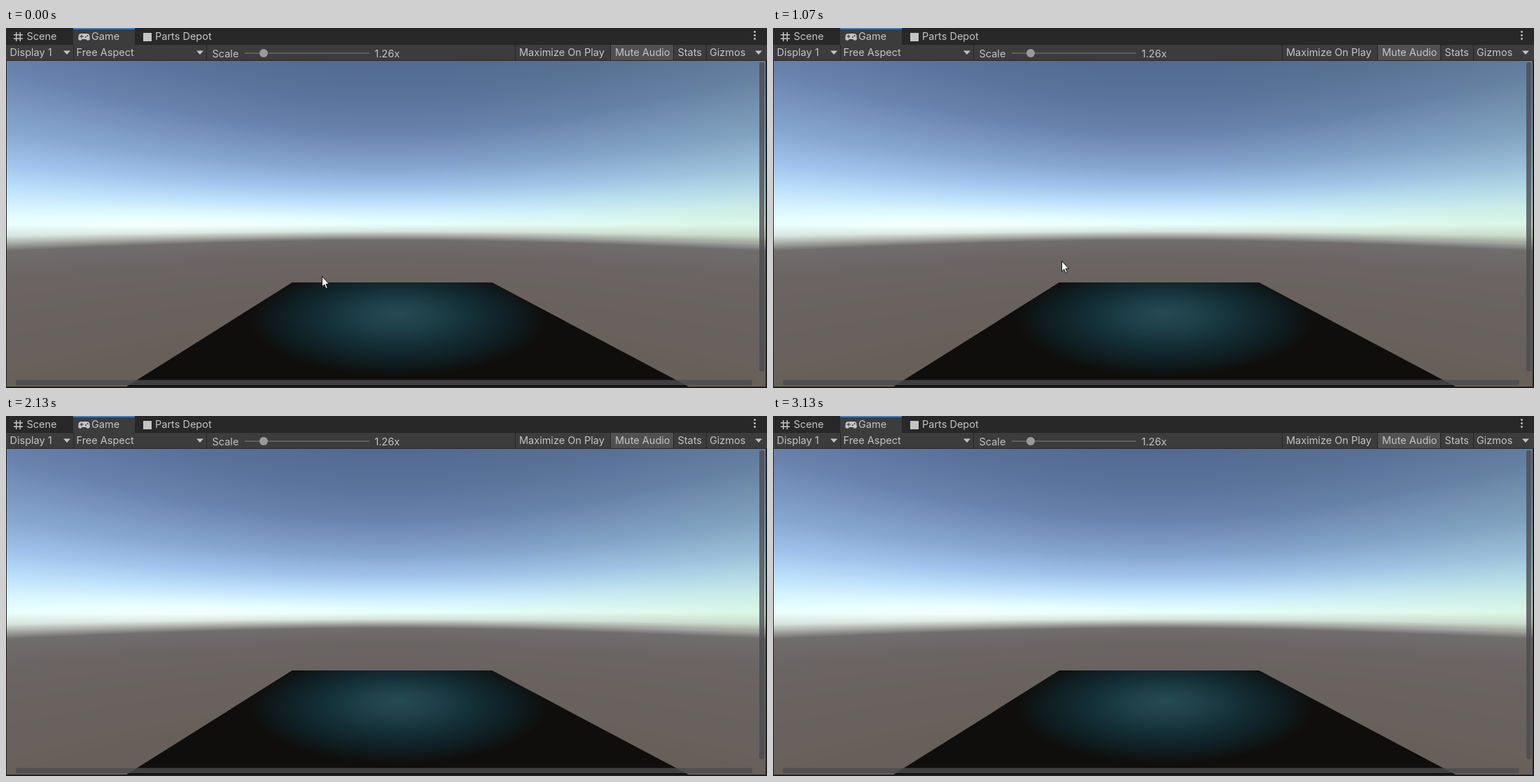
Animation, 1087 px wide and 515 px high, one loop 3340 ms. Source, as an HTML page with a canvas:

```html
<!DOCTYPE html>
<html lang="en">
<head>
<meta charset="utf-8">
<title>Game view</title>
<style>
  html, body { margin: 0; width: 100%; height: 100%; overflow: hidden; background: #202020; }
  canvas { display: block; }
</style>
</head>
<body>
<canvas id="stage" width="1087" height="515"></canvas>
<script>
const W = 1087, H = 515, LOOP = 3340;
const VIEW = { x: 1, y: 47, w: 1084, h: 466 };
const ctx = document.getElementById('stage').getContext('2d');

function layer(w, h, paint) {
  const c = document.createElement('canvas');
  c.width = w;
  c.height = h;
  paint(c.getContext('2d'));
  return c;
}

function rect(g, color, x, y, w, h) {
  g.fillStyle = color;
  g.fillRect(x, y, w, h);
}

function poly(g, color, points) {
  g.fillStyle = color;
  g.beginPath();
  points.forEach(([x, y]) => g.lineTo(x, y));
  g.closePath();
  g.fill();
}

function disc(g, color, x, y, r) {
  g.fillStyle = color;
  g.beginPath();
  g.arc(x, y, r, 0, Math.PI * 2);
  g.fill();
}

// Slope above the horizon, with its colour
const SKY = [
  [-0.6, 0x67605b], [-0.35, 0x67605a], [-0.124, 0x6a6463], [-0.057, 0x706d6c],
  [-0.04, 0xa9ada9], [-0.025, 0xd4e3de], [0, 0xe6fffc], [0.037, 0xd4f3fd],
  [0.074, 0xbee1fb], [0.124, 0xa3c5ed], [0.198, 0x86a6d0], [0.322, 0x6983ae],
  [0.445, 0x5a739b], [0.58, 0x526a91]
];
const rgb = n => [n >> 16, n >> 8 & 255, n & 255];

function skyColor(slope) {
  let i = 1;
  while (i < SKY.length - 1 && SKY[i][0] < slope) i++;
  const [s0, c0] = SKY[i - 1], [s1, c1] = SKY[i];
  const k = (slope - s0) / (s1 - s0), b = rgb(c1);
  return rgb(c0).map((v, j) => v + (b[j] - v) * k);
}

function paintSky(g) {
  const focal = 404, image = g.createImageData(VIEW.w, VIEW.h);
  for (let y = 0, p = 0; y < VIEW.h; y++) {
    for (let x = 0; x < VIEW.w; x++, p += 4) {
      const slope = (VIEW.h / 2 - y) / Math.hypot(focal, x - VIEW.w / 2);
      const [r, gr, b] = skyColor(slope);
      const shade = slope > -0.04 ? Math.max(0, (x - 600) / 487) : 0;
      const glow = 14 * Math.exp(-((slope / 0.04) ** 2) - ((x - 250) / 230) ** 2);
      image.data.set([r * (1 - 0.05 * shade) + glow, gr * (1 - 0.03 * shade) + glow / 2,
        b * (1 - 0.09 * shade) + glow / 2, 255], p);
    }
  }
  g.putImageData(image, VIEW.x, VIEW.y);
}

function paintPlatform(g) {
  const shape = [[409, 364], [694, 364], [975, 513], [172, 513]];
  poly(g, '#0f0e0c', shape);
  g.save();
  g.clip();
  g.translate(560, 0);
  g.scale(2.65, 1);
  const light = g.createRadialGradient(0, 408, 0, 0, 418, 80);
  [[0, '#264b52'], [0.25, '#1e4048'], [0.5, '#142f37'], [0.75, '#0f2024'], [1, '#0f0e0c']]
    .forEach(([at, color]) => light.addColorStop(at, color));
  rect(g, light, -90, 364, 180, 149);
  g.restore();
}

function paintBars(g) {
  const ink = '#c4c4c4', line = '#262626';
  const label = (text, x, y) => {
    g.fillStyle = ink;
    g.fillText(text, x, y);
  };
  const arrow = x => poly(g, ink, [[x - 5, 32.5], [x + 5, 32.5], [x, 38]]);

  rect(g, '#282828', 0, 0, W, 24);
  rect(g, '#3c3c3c', 0, 24, W, 23);
  rect(g, '#3c3c3c', 96, 0, 88, 24);
  rect(g, '#3a79bb', 96, 0, 88, 2);
  rect(g, '#232323', 0, 23, 96, 1);
  rect(g, '#232323', 184, 23, W - 184, 1);
  rect(g, '#515151', 863, 24, 90, 23);
  [96, 286, 727, 863, 953, 1000].forEach(x => rect(g, line, x, 24, 1, 23));
  rect(g, line, 0, 46, W, 1);

  g.font = '14.5px Inter, sans-serif';
  label('Scene', 29.5, 17);
  label('Game', 122, 17);
  label('Parts Depot', 213, 17);
  label('Display 1', 5.5, 40);
  label('Free Aspect', 100.5, 40);
  label('Scale', 294.5, 42);
  label('1.26x', 526.5, 42);
  label('Maximize On Play', 733, 40);
  label('Mute Audio', 870, 40);
  label('Stats', 959.5, 40);
  label('Gizmos', 1005, 40);
  [87, 277, 1075].forEach(arrow);
  [5.5, 10.5, 15.5].forEach(y => disc(g, ink, 1069.5, y, 1.4));

  [14, 19.5].forEach(x => rect(g, ink, x, 6, 1.5, 13));
  [9, 14.5].forEach(y => rect(g, ink, 11, y, 13, 1.5));
  g.fillStyle = ink;
  g.beginPath();
  g.roundRect(103.5, 8, 16, 8, 4);
  g.fill();
  disc(g, ink, 106, 15, 2.8);
  disc(g, ink, 117, 15, 2.8);
  rect(g, '#3c3c3c', 105.5, 11.5, 5, 1.2);
  rect(g, '#3c3c3c', 107.4, 9.6, 1.2, 5);
  disc(g, '#3c3c3c', 114, 13, 1);
  disc(g, '#3c3c3c', 116.5, 11, 1);
  rect(g, ink, 196, 7, 12, 12);

  rect(g, '#5e5e5e', 341, 35, 178, 2);
  disc(g, '#999', 368, 36, 6);
}

const backdrop = layer(W, H, g => {
  rect(g, '#202020', 0, 0, W, H);
  paintSky(g);
  paintPlatform(g);
  paintBars(g);
});

const RING = 400;
const makeRing = color => layer(RING, RING, g => {
  const image = g.createImageData(RING, RING), half = RING / 2;
  for (let y = 0, p = 0; y < RING; y++) {
    for (let x = 0; x < RING; x++, p += 4) {
      const dx = (x - half) / half, dy = (y - half) / half;
      const angle = Math.atan2(dy, dx);
      const inner = 0.62 + 0.03 * Math.sin(3 * angle + 1) + 0.02 * Math.sin(7 * angle);
      const k = (Math.hypot(dx, dy) - inner) / (1 - inner);
      const weight = 0.76 + 0.2 * Math.cos(angle + 0.6) + 0.04 * Math.sin(5 * angle);
      const alpha = k > 0 && k < 1 ? Math.sin(Math.PI * k) ** 1.3 * weight : 0;
      image.data.set([...color, alpha * 255], p);
    }
  }
  g.putImageData(image, 0, 0);
});
const addRing = makeRing([255, 235, 120]);
const dodgeRing = makeRing([155, 147, 65]);

const frameStart = n => Math.round(n * 20 / 3) * 10;
function frameAt(t) {
  let n = Math.ceil(t * 3 / 200) + 1;
  while (frameStart(n) > t) n--;
  return n;
}

// age: share of the lifetime already gone on the first visible frame
const BURSTS = [
  { frame: 13, age: 0.265, x: 536, y: 271, sx: 1.01, sy: 0.98 },
  { frame: 28, age: 0.107, x: 544, y: 278, sx: 0.94, sy: 1.06 },
  { frame: 43, age: 0.022, x: 538, y: 282, sx: 0.95, sy: 1.14 }
];
const AGE_STEP = 0.325;

function drawRing(burst, radius, alpha) {
  const pass = (mode, sprite, strength) => {
    ctx.globalCompositeOperation = mode;
    ctx.globalAlpha = strength;
    ctx.drawImage(sprite, -radius, -radius, radius * 2, radius * 2);
  };
  ctx.save();
  ctx.translate(burst.x, burst.y);
  ctx.scale(burst.sx, burst.sy);
  ctx.rotate(0.1);
  pass('lighter', addRing, alpha * 0.17);
  pass('color-dodge', dodgeRing, alpha);
  ctx.restore();
}

function drawBursts(n) {
  ctx.save();
  ctx.beginPath();
  ctx.rect(VIEW.x, VIEW.y, VIEW.w, VIEW.h);
  ctx.clip();
  for (const burst of BURSTS) {
    const age = burst.age + (n - burst.frame) * AGE_STEP;
    if (n < burst.frame || age >= 1) continue;
    const outer = 360 * (1 - (1 - age) ** 2);
    const inner = Math.min(285 * age ** 0.68, outer * 0.86);
    drawRing(burst, outer, Math.min(1, (1 - age) * 1.05));
    drawRing(burst, inner, Math.min(1, (1 - age) * 2));
  }
  ctx.restore();
}

// First frame of each pointer position; no position means hidden
const POINTER = [[0, 451, 355], [1, 412, 333], [9, 401, 324], [10, 412, 333],
  [21, 378, 375], [22, 313, 450], [23]];

function drawPointer(n) {
  const [, x, y] = POINTER.filter(step => step[0] <= n).pop();
  if (x === undefined) return;
  ctx.save();
  ctx.translate(x, y);
  ctx.beginPath();
  [[0.5, 0.5], [0.5, 15], [3.8, 12], [6, 17.6], [8.3, 16.6], [6, 11.2], [10.4, 11.2]]
    .forEach(([px, py]) => ctx.lineTo(px, py));
  ctx.closePath();
  ctx.fillStyle = '#fff';
  ctx.fill();
  ctx.strokeStyle = '#111';
  ctx.lineWidth = 1;
  ctx.stroke();
  ctx.restore();
}

function drawScrollbars() {
  ctx.fillStyle = 'rgba(75, 75, 79, 0.8)';
  ctx.beginPath();
  ctx.roundRect(14, 503.5, 1052, 7.5, 3);
  ctx.roundRect(1076, 49, 7.5, 442, 3);
  ctx.fill();
}

function draw(now) {
  const n = frameAt(now % LOOP);
  ctx.drawImage(backdrop, 0, 0);
  drawBursts(n);
  drawScrollbars();
  drawPointer(n);
}

const begin = performance.now();
function tick() {
  draw(performance.now() - begin);
  requestAnimationFrame(tick);
}
tick();
</script>
</body>
</html>
```
